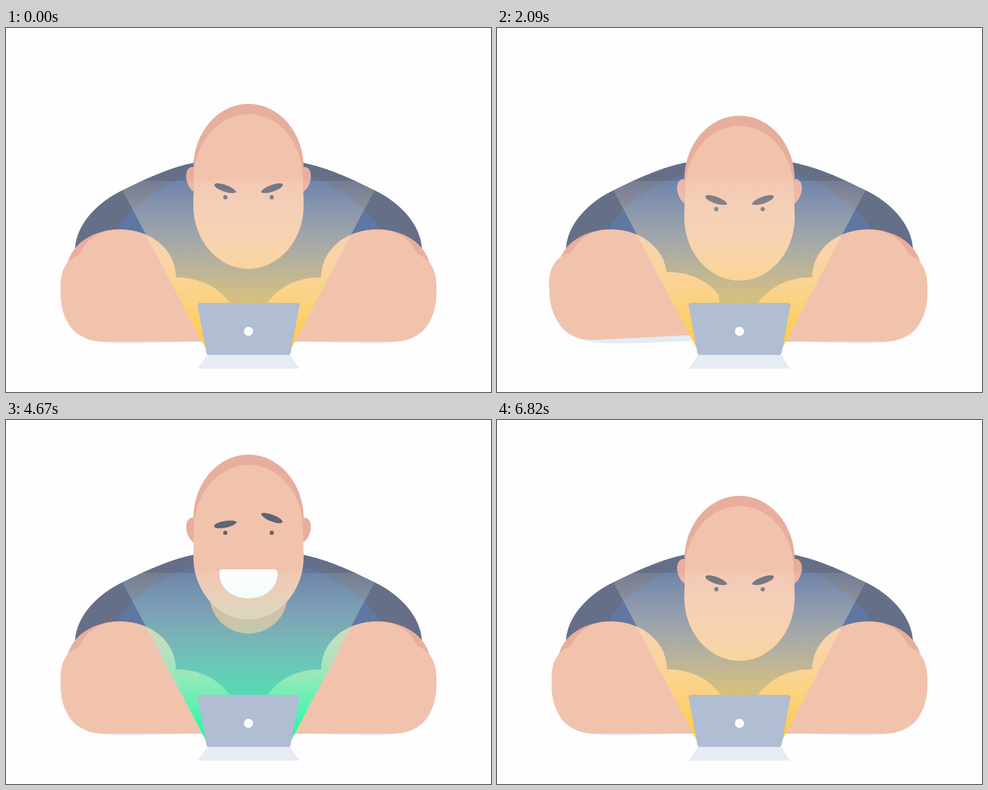
Recreate the animation shown at these times as an HTML page. Size 800 by 600 pixels, loop 6850 ms.

```html
<!DOCTYPE html>
<html lang="en">
<head>
<meta charset="utf-8">
<title>Typing</title>
<style>
html, body { margin: 0; width: 100%; height: 100%; overflow: hidden; background: #fefefe; }
svg { display: block; width: 800px; height: 600px; }
</style>
</head>
<body>
<svg viewBox="0 0 800 600">
  <defs>
    <linearGradient id="glow" gradientUnits="userSpaceOnUse" x1="0" y1="252" x2="0" y2="525">
      <stop id="glowTop" offset="0" stop-opacity=".1"/>
      <stop id="glowEnd" offset="1"/>
    </linearGradient>
    <g id="upperArm">
      <path fill="#e8ae9d" d="M101 390C108 355 145 332 187 332C240 332 280 366 280 411V450H101Z"/>
      <path fill="#f1c3ad" d="M120 376C130 350 155 332 187 332C240 332 280 366 280 411V470H120Z"/>
    </g>
    <path id="forearm" fill="#f1c3ad" d="M90 430C89 400 100 378 124 373L200 378L280 411C320 411 350 427 369 453V517H160C118 517 91 486 90 440Z"/>
    <path id="shade" fill="#e6ebf3" d="M100 480C106 510 148 520 195 520C250 520 290 516 340 516V480Z"/>
    <path id="ear" fill="#e8ae9d" d="M313 230C301 226 297 236 297 245C298 258 305 270 315 272Z"/>
    <path id="brow" fill="#5f6471" d="M-19 0C-16 -6 11 -7 18.5 -1C20 1 12 6 -2 6C-12 6 -20 4 -19 0Z"/>
  </defs>

  <use href="#shade"/>
  <use href="#shade" transform="matrix(-1 0 0 1 800 0)"/>
  <path fill="#e6ebf4" d="M332 538H468L484 561.5H316Z"/>

  <path fill="#666f88" d="M114 362C117 322 152 286 195 266C235 246 275 229 310 222C360 213 440 213 490 222C525 229 565 246 605 266C648 286 683 322 686 362V400H114Z"/>
  <path fill="#6077a1" d="M182 334C200 300 250 258 310 241C360 228 440 228 490 241C550 258 600 300 618 334V500H182Z"/>
  <ellipse cx="400" cy="290" rx="64" ry="62" fill="#dda48e"/>

  <use href="#upperArm"/>
  <use href="#upperArm" transform="matrix(-1 0 0 1 800 0)"/>
  <use id="armL" href="#forearm"/>
  <g transform="matrix(-1 0 0 1 800 0)"><use id="armR" href="#forearm"/></g>

  <g id="head">
    <use href="#ear"/>
    <use href="#ear" transform="matrix(-1 0 0 1 800 0)"/>
    <ellipse cx="400" cy="230" rx="91" ry="105" fill="#e8ae9d"/>
    <path fill="#f1c3ad" d="M310 250C310 190 350 142 400 142S490 190 490 250C490 266 491 278 491 293C491 350 450 397 400 397S309 350 309 293C309 278 310 266 310 250Z"/>
    <g id="face">
      <ellipse id="eyeL" cx="361.7" cy="279" rx="3.5" fill="#5f6471"/>
      <ellipse id="eyeR" cx="438.3" cy="279" rx="3.5" fill="#5f6471"/>
      <use id="browL" href="#brow"/>
      <use id="browR" href="#brow"/>
      <path id="mouth" fill="#fefefe" d="M-42 -14H42Q48 -14 48 -8C48 18 26 34 0 34S-48 18 -48 -8Q-48 -14 -42 -14Z"/>
    </g>
  </g>

  <path fill="url(#glow)" d="M184 252H616L471 527H329Z"/>
  <path fill="#b0bdd2" d="M320 453H480Q484.500 453 484 457L469.500 535Q469 539 465 539H335Q331 539 330.500 535L316 457Q315.500 453 320 453Z"/>
  <circle cx="400" cy="500" r="7.600" fill="#fefefe"/>
</svg>
<script>
const LOOP = 6850;
const $ = id => document.getElementById(id);
const place = (id, value) => $(id).setAttribute('transform', value);
const mix = (a, b, k) => a + (b - a) * k;
const ramp = (t, from, to) => Math.min(1, Math.max(0, (t - from) / (to - from)));
const smooth = k => k * k * (3 - 2 * k);
const ease = (t, from, to) => smooth(ramp(t, from, to));
// Rises over [a, b], falls over [c, d]
const span = (t, a, b, c, d) => ease(t, a, b) * (1 - ease(t, c, d));

// cubic-bezier(.5, 0, .5, 1)
function slowEase(x) {
  let lo = 0, hi = 1;
  for (let i = 0; i < 20; i++) {
    const m = (lo + hi) / 2;
    if (1.5 * m * (1 - m) + m ** 3 < x) lo = m; else hi = m;
  }
  return smooth(lo);
}

const YELLOW = { top: [255, 250, 240], end: [255, 202, 62] };
const GREEN = { top: [230, 255, 240], end: [20, 250, 165] };
const blend = (a, b, k) => `rgb(${a.map((v, i) => Math.round(mix(v, b[i], k)))})`;

function blink(t) {
  for (const at of [3990, 5990]) {
    if (t >= at && t < at + 60) return t < at + 30 ? .45 : .12;
  }
  return 1;
}

function arms(t) {
  const beat = t < 2090 ? 155.5 : 170;
  const swing = Math.cos(Math.PI * (t - 2090) / beat);
  const lift = 2.8 * ease(t, 0, 150) * (1 - ease(t, 3300, 3480));
  place('armL', `rotate(${-lift * (1 + swing) / 2} 100 508)`);
  place('armR', `rotate(${-lift * (1 - swing) / 2} 100 508)`);
}

function draw(t) {
  arms(t);

  const up = span(t, 2950, 3490, 6290, 6815);
  const sink = t < 6000 ? 24.5 * slowEase(ramp(t, 356, 2950)) : 0;
  place('head', `translate(0 ${mix(sink, -68, up)})`);
  place('face', `translate(0 ${-25 * up})`);

  const glad = span(t, 3180, 3590, 6290, 6815);
  place('browL', `translate(362 ${mix(264, 264.5, glad)}) rotate(${mix(21, -9, glad)})`);
  place('browR', `translate(438.300 ${mix(264, 254, glad)}) rotate(${mix(-21, 20, glad)}) scale(-1 1)`);
  place('mouth', `translate(400 353) scale(${span(t, 3180, 3590, 5290, 5700)})`);
  for (const id of ['eyeL', 'eyeR']) $(id).setAttribute('ry', 3.5 * blink(t));

  const green = span(t, 2980, 3490, 4650, 5070);
  $('glowTop').setAttribute('stop-color', blend(YELLOW.top, GREEN.top, green));
  $('glowEnd').setAttribute('stop-color', blend(YELLOW.end, GREEN.end, green));
}

const start = performance.now();
function tick() {
  draw((performance.now() - start) % LOOP);
  requestAnimationFrame(tick);
}
tick();
</script>
</body>
</html>
```
